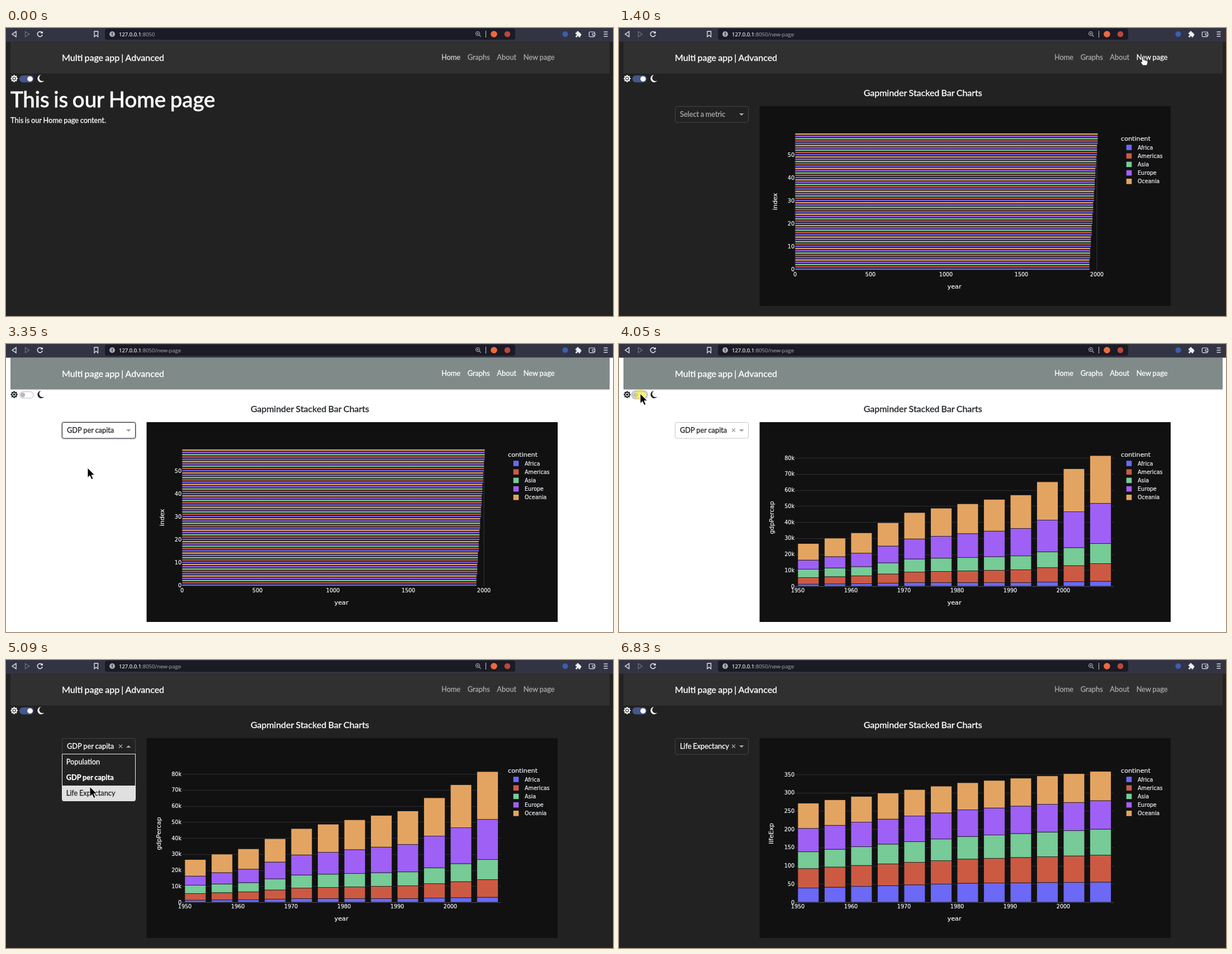
Write an HTML page with a canvas that moves like this. It is 1086 px wide and 516 px high and loops after 6.92 s.

```html
<!DOCTYPE html>
<html lang="en">
<head>
<meta charset="utf-8">
<title>Multi page app</title>
<style>
html, body { margin: 0; width: 100%; height: 100%; overflow: hidden; background: #222; }
canvas { display: block; }
</style>
</head>
<body>
<canvas id="stage" width="1086" height="516"></canvas>
<script>
const c = document.getElementById('stage').getContext('2d');
const LOOP = 6920;
const LATO = 'Lato, sans-serif', PLOT = '"DejaVu Sans", sans-serif', UI = '"Open Sans", sans-serif';
const CONTINENTS = ['Africa', 'Americas', 'Asia', 'Europe', 'Oceania'];
const COLORS = ['#6b69f6', '#cc5a43', '#76cb97', '#9f60f6', '#e4a461'];
const OPTIONS = ['Population', 'GDP per capita', 'Life Expectancy'];

// One row per continent, given at a few bars (knots) and linear between them
const GDP = {
  title: 'gdpPercap', x: 277, step: 10, count: 8, scale: 2.875, unit: 'k', knots: [0, 2, 4, 8, 11],
  rows: [
    [1.3, 1.6, 2.3, 2.3, 3.1], [4.1, 4.9, 6.5, 8, 11], [5.2, 5.7, 8.2, 8.6, 12.5],
    [5.7, 8.4, 12.5, 17.1, 25], [10.3, 12.7, 16.4, 20.9, 29.8]
  ]
};
const LIFE = {
  title: 'lifeExp', x: 276, step: 50, count: 7, scale: 0.6547, unit: '', knots: [0, 6, 11],
  rows: [[39, 52, 55], [53, 66, 74], [46, 62, 71], [64, 73, 78], [69, 74, 80]]
};

// Pointer moves: start, end, place; it rests in between
const TOGGLE = [38, 89], SELECT = [150, 151], ENTRY = [1033, 458];
const MOVES = [
  [70, 620, [895, 52]], [840, 1050, [937, 51]], [1540, 2240, TOGGLE],
  [2660, 2940, SELECT], [3060, 3280, [146, 222]], [3490, 3910, TOGGLE],
  [4190, 4740, SELECT], [4880, 5090, [150, 227]], [5600, 6230, [970, 516]]
];
const CLICKS = [2240, 2940, 3280, 4050, 4810, 5290];

const within = (t, a, b) => t >= a && t < b;
const mix = (a, b, u) => a + (b - a) * u;

function pointer(t) {
  if (!within(t, 70, 6230)) return null;
  let [x, y] = ENTRY;
  for (const [from, to, place] of MOVES) {
    const u = Math.min(1, Math.max(0, (t - from) / (to - from))), e = u * u * (3 - 2 * u);
    x = mix(x, place[0], e);
    y = mix(y, place[1], e);
  }
  return { x, y };
}

function sample(row, knots, k) {
  const i = Math.max(1, knots.findIndex(n => n >= k));
  return mix(row[i - 1], row[i], (k - knots[i - 1]) / (knots[i] - knots[i - 1]));
}

function text(s, x, y, size, color, font = LATO, align = 'left', weight = 400) {
  c.font = `${weight} ${size}px ${font}`;
  c.wordSpacing = `${-0.055 * size}px`;
  c.textAlign = align;
  c.fillStyle = c.strokeStyle = color;
  c.lineWidth = size * 0.022;
  c.fillText(s, x, y);
  c.strokeText(s, x, y);
  return c.measureText(s).width;
}

function rect(x, y, w, h, color) {
  c.fillStyle = color;
  c.fillRect(x, y, w, h);
}

function line(x0, y0, x1, y1, color, width = 1) {
  c.strokeStyle = color;
  c.lineWidth = width;
  c.beginPath();
  c.moveTo(x0, y0);
  c.lineTo(x1, y1);
  c.stroke();
}

function paint(path, fill, stroke, width = 1) {
  if (fill) { c.fillStyle = fill; c.fill(path); }
  if (stroke) { c.strokeStyle = stroke; c.lineWidth = width; c.stroke(path); }
}

const shape = (d, fill, stroke, width) => paint(new Path2D(d), fill, stroke, width);

function disc(x, y, r, fill, stroke, width) {
  const p = new Path2D();
  p.arc(x, y, r, 0, 7);
  paint(p, fill, stroke, width);
}

function box(x, y, w, h, r, fill, stroke, width) {
  const p = new Path2D();
  p.roundRect(x, y, w, h, r);
  paint(p, fill, stroke, width);
}

function toolbar(path) {
  rect(0, 0, 1086, 24.5, '#333443');
  shape('M18 6.3V15.7L11 11Z', null, '#f0f0f4', 1.3);
  shape('M34.5 6.3V15.7L41.5 11Z', null, '#73747f', 1.2);
  shape('M64.4 8.2A4.5 4.5 0 1 0 65.2 12', null, '#f0f0f4', 1.4);
  shape('M65.8 5.5V9.8H61.5Z', '#f0f0f4');
  shape('M158 6H164.5V15.8L161.2 12.8L158 15.8Z', null, '#e4e4ea', 1.3);
  box(177, 1, 734, 20, 4, '#1a1b25');
  disc(190, 11, 5, '#a9aab2');
  rect(189.4, 8, 1.3, 4, '#1a1b25');
  rect(189.4, 12.8, 1.3, 1.3, '#1a1b25');
  const w = text('127.0.0.1', 202, 14.5, 9.5, '#f0f0f4', UI);
  text(':8050' + path, 202 + w, 14.5, 9.5, '#8f9099', UI);
  disc(844, 10, 3.6, null, '#b5b6be');
  shape('M846.5 12.5L849.5 15.5M842.3 10H845.7M844 8.3V11.7', null, '#b5b6be', 1.1);
  line(858.5, 5, 858.5, 17, '#c9c9d0');
  disc(873, 11, 5.8, '#ee6a3c');
  disc(897, 11, 5.3, '#b9473f');
  disc(1000.5, 11, 5, '#3c5fae');
  box(1019, 8, 8.5, 8.5, 1, '#f0f0f4');
  disc(1023, 7.5, 1.9, '#f0f0f4');
  disc(1027.5, 12, 1.9, '#f0f0f4');
  disc(1019.5, 12.5, 1.4, '#333443');
  disc(1023.3, 16, 1.4, '#333443');
  box(1043.3, 7, 10, 8.6, 1.5, null, '#e4e4ea', 1.2);
  box(1049, 9.7, 5, 3.4, 1, '#333443', '#e4e4ea', 1.1);
  for (let y = 7; y <= 15; y += 4) line(1069.5, y, 1076.5, y, '#f0f0f4', 1.3);
}

// Draws the bar and tells whether the pointer is on a link
function navbar(t, light, p) {
  rect(8, 24.5, 1072, 57, light ? '#808a88' : '#303030');
  text('Multi page app | Advanced', 100, 59, 16, '#fff');
  let x = 779, onLink = false;
  for (const label of ['Home', 'Graphs', 'About', 'New page']) {
    c.font = '12.8px ' + LATO;
    const hover = p && within(p.y, 44, 66) && within(p.x, x, x + c.measureText(label).width);
    const focus = label === 'New page' && within(t, 1050, 2440);
    let shade = 168;
    if (light || hover || focus) shade = 255;
    else if (label === 'Home') shade += 38 * Math.max(0, 1 - Math.max(0, t - 70) / 150);
    x += text(label, x, 57, 12.8, `rgb(${shade},${shade},${shade})`) + 12.6;
    onLink ||= hover;
  }
  return onLink;
}

function themeSwitch(t, light, fg) {
  c.save();
  c.translate(14.6, 90.6);
  for (let i = 0; i < 8; i++) {
    c.rotate(Math.PI / 4);
    shape('M-2.4 -4L0 -6.8L2.4 -4Z', fg);
  }
  disc(0, 0, 3.9, null, fg, 1.5);
  disc(0, 0, 2, fg);
  c.restore();
  if (within(t, 2240, 2940) || within(t, 3980, 4810))
    box(21.5, 82.8, 30.5, 16.5, 8, light ? '#c9cbd0' : '#2b3550');
  if (light) box(24.5, 85.5, 24.5, 11.5, 5.8, '#fff', '#b8b8b8');
  else box(24, 85, 25.5, 12.5, 6.2, '#45578a');
  disc(light ? 30 : 43, 91.2, light ? 4.2 : 4.8, light ? '#b9b9b9' : '#fff');
  shape('M62.5 84A6.6 6.6 0 1 0 68.3 94.5A5.8 5.8 0 0 1 62.5 84Z', fg);
}

function dropdown(t, light, fg, bg, p) {
  const open = within(t, 2940, 3280) || within(t, 4880, 5290);
  const ring = !open && (within(t, 2940, 3980) || within(t, 4810, 6830));
  const value = t < 3280 ? '' : OPTIONS[t < 5290 ? 1 : 2];
  const grey = light ? '#999' : '#aaa';
  if (ring) box(98.5, 138.5, 135, 32.5, 5, light ? '#cfd2da' : '#343944');
  box(100.5, 140.5, 131, 28.5, 3, bg, ring ? fg : light ? '#c4c4c4' : '#444');
  text(value || 'Select a metric', 109, 159, 12.8, value ? fg : grey);
  if (within(t, 3420, 5290) || t >= 5600)
    shape('M202 151.5L208 157.5M208 151.5L202 157.5', null, grey, 1.1);
  shape(open ? 'M215 157H223.5L219.2 153Z' : 'M215 153H223.5L219.2 157Z', grey);
  if (!open) return;
  box(100.5, 168.5, 131, 84, [0, 0, 3, 3], bg, light ? '#aaa' : '#eee');
  const hovered = p.y < 169 ? (value ? 1 : 0) : Math.min(2, Math.floor((p.y - 169) / 28));
  OPTIONS.forEach((label, i) => {
    const on = i === hovered, y = 169 + 28 * i;
    if (on) rect(101, y, 130, 27.5, '#e0e0e0');
    text(label, 107.7, y + 18.2, 12.8, on ? '#222' : fg, LATO, 'left', label === value ? 700 : 400);
  });
}

const label = (s, x, y, align, size = 9.6) => text(s, x, y, size, '#f2f5fa', PLOT, align);

function bar(x, y, w, h, color) {
  rect(x, y, w, h, color);
  c.strokeStyle = '#161616';
  c.lineWidth = 0.8;
  c.strokeRect(x, y, w, h);
}

function indexBars() {
  for (let v = 0; v <= 2000; v += 500) {
    const x = 315 + v * 0.27;
    line(x, 188, x, 434, '#343840');
    label(v, x, 444.5, 'center');
  }
  for (let i = 0; i < 60; i++) {
    const year = 1952 + 5 * Math.floor(i / 5);
    bar(315, 430.4 - 4.1 * i, year * 0.27, 3.28, COLORS[i % 5]);
  }
  for (let v = 0; v <= 50; v += 10) label(v, 314, 435.8 - 4.1 * v, 'right');
}

function stackedBars({ rows, knots, step, count, scale, unit }) {
  for (let i = 0; i <= count; i++) {
    const y = 434 - i * step * scale, row = Math.round(y) + 0.5;
    line(315, row, 885, row, i ? '#2b2f36' : '#4a505c');
    label(i ? i * step + unit : 0, 314, y + 3.7, 'right');
  }
  for (let k = 0; k < 12; k++) {
    let y = 434;
    rows.forEach((row, j) => {
      const h = sample(row, knots, k) * scale;
      y -= h;
      bar(319.9 + 47.52 * k, y, 37.8, h, COLORS[j]);
    });
  }
  for (let i = 0; i < 6; i++) label(1950 + 10 * i, 320 + 95 * i, 444.5, 'center');
}

function chart(t) {
  rect(251.5, 140, 735.5, 358, '#111');
  const data = t < 3630 ? null : t < 5360 ? GDP : LIFE;
  if (data) stackedBars(data);
  else indexBars();
  c.save();
  c.translate(data ? data.x : 283, 311);
  c.rotate(-Math.PI / 2);
  label(data ? data.title : 'index', 0, 0, 'center', 11.2);
  c.restore();
  label('year', 600, 467, 'center', 11.2);
  label('continent', 898, 202.3, 'left', 11.2);
  CONTINENTS.forEach((name, i) => {
    const y = 214 + 15.2 * i;
    rect(907.7, y - 4.8, 9.6, 9.6, COLORS[i]);
    label(name, 928, y + 3.5, 'left');
  });
}

function cursor(t, p, hand) {
  if (CLICKS.some(k => within(t, k - 70, k + 70))) disc(p.x, p.y + 2, 9, 'rgba(240,230,40,.65)');
  c.save();
  c.translate(p.x, p.y);
  if (hand)
    shape('M-1.5 1Q0 -1 1.5 1V6L8 7.5Q9.5 8 9 11L7.5 16H0L-4 10Q-4 8 -1.5 10Z', '#fff', '#222', 0.9);
  else
    shape('M0 0V17.5L4 13.8L7 20.5L10 19.2L7 12.7H12.5Z', '#000', '#fff', 0.9);
  c.restore();
}

function draw(now) {
  const t = now % LOOP;
  const light = within(t, 2440, 4190);
  const bg = light ? '#fff' : '#222', fg = light ? '#212529' : '#fff';
  const p = pointer(t);
  rect(0, 0, 1086, 516, bg);
  const onLink = navbar(t, light, p);
  themeSwitch(t, light, fg);
  if (t < 1390) {
    text('This is our Home page', 8, 141.5, 38.4, fg);
    text('This is our Home page content.', 8, 169.8, 12.8, fg);
  } else {
    text('Gapminder Stacked Bar Charts', 543.7, 122, 16, fg, LATO, 'center');
    chart(t);
    dropdown(t, light, fg, bg, p);
  }
  toolbar(t < 1250 ? '' : '/new-page');
  if (p) cursor(t, p, onLink);
  requestAnimationFrame(draw);
}
requestAnimationFrame(draw);
</script>
</body>
</html>
```
